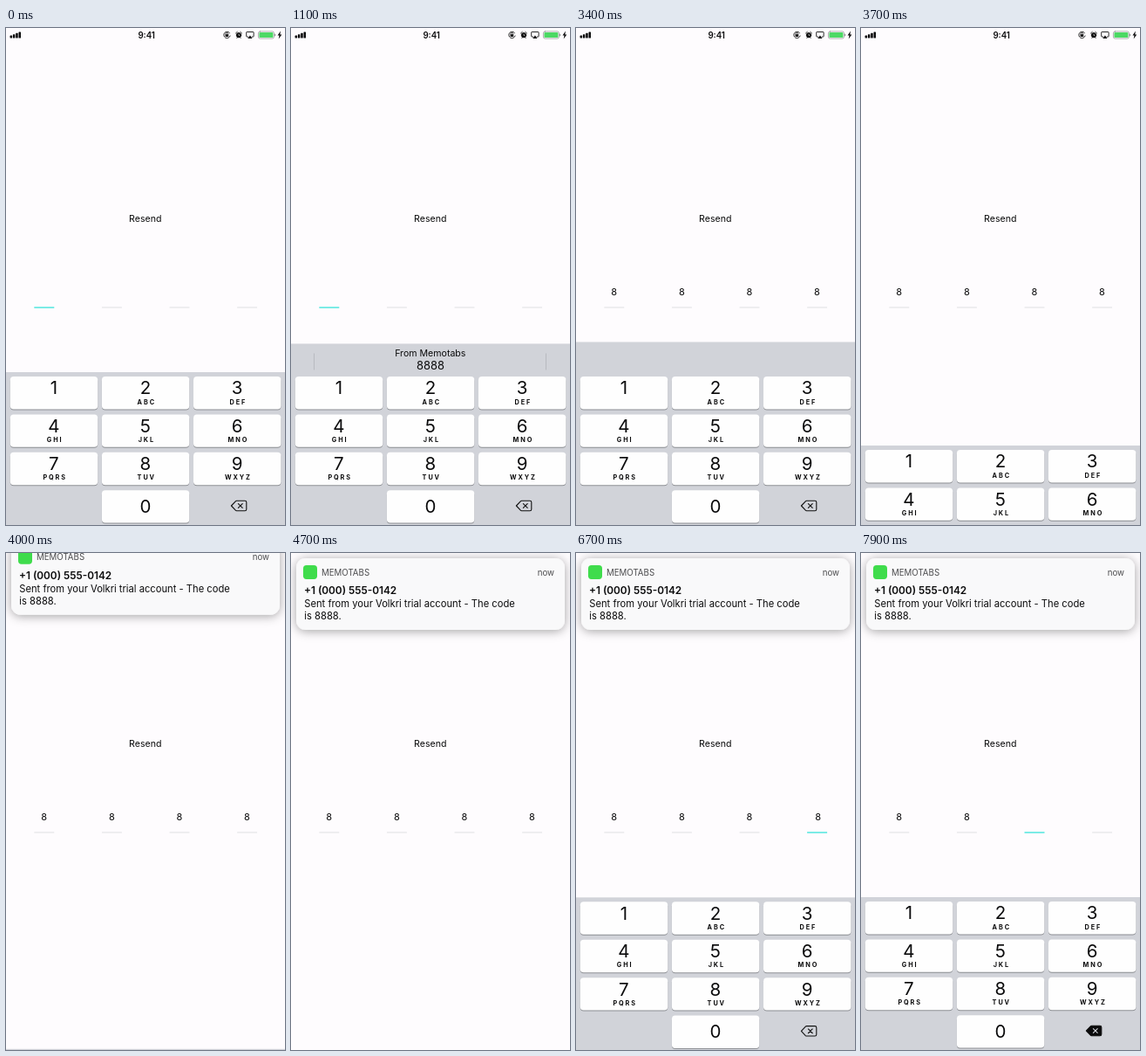
Animation, 320 px wide and 569 px high, one loop 8000 ms. Source, as an HTML page:

```html
<!DOCTYPE html>
<html lang="en">
<head>
<meta charset="utf-8">
<title>Code entry</title>
<style>
html, body { margin: 0; width: 100%; height: 100%; overflow: hidden; background: #fefcfe; }
svg { display: block; width: 100%; height: 100%; font-family: Inter, Roboto, sans-serif; fill: #0b0b0c; }
.mid { text-anchor: middle; }
.label { font-size: 10.6px; }
.digit { font-size: 20.5px; }
.letters { font-size: 7.3px; font-weight: 700; letter-spacing: 1.9px; }
.body { font-size: 11.2px; }
.meta { font-size: 9.7px; fill: #4c4c4e; }
.line { fill: none; stroke: #111; stroke-linejoin: round; stroke-linecap: round; }
</style>
</head>
<body>
<svg viewBox="0 0 320 569">
  <defs>
    <filter id="shade" x="-10%" y="-40%" width="120%" height="180%">
      <feDropShadow dx="0" dy="1.5" stdDeviation="6" flood-color="#000" flood-opacity=".36"/>
    </filter>
  </defs>
  <rect width="320" height="569" fill="#fefcfe"/>

  <g id="status">
    <g id="signal"></g>
    <text class="mid" x="161.2" y="11.5" font-size="9.7" font-weight="600">9:41</text>
    <g class="line" stroke-width=".9">
      <path d="M256.6 5.8A3.7 3.7 0 1 0 257.1 9"/>
      <path d="M252.2 7.4v-.8a1.2 1.2 0 0 1 2.4 0v.8"/>
      <circle cx="267" cy="8.2" r="2.7" fill="#111"/>
      <path d="M263.5 6l1.7-1.6M270.5 6l-1.7-1.6M264.9 11.5l.7-.8M269.1 11.5l-.7-.8"/>
      <path d="M277.6 10h-1.4q-.5 0-.5-.5V5q0-.5.5-.5h7.4q.5 0 .5.5v4.5q0 .5-.5.5h-1.4"/>
      <rect x="289.4" y="3.9" width="18" height="8.2" rx="2" stroke="#8b8b8d" stroke-width=".7"/>
    </g>
    <rect x="251.6" y="7.3" width="3.6" height="2.6" rx=".4"/>
    <path d="M267 6.7v1.7h1.2" fill="none" stroke="#fff" stroke-width=".6"/>
    <path d="M279.9 8.6l2.7 3.4h-5.4z"/>
    <rect x="290.4" y="4.9" width="16" height="6.2" rx="1.2" fill="#4cd964"/>
    <path d="M308.1 6.6q1.2.3 1.2 1.4t-1.2 1.4z" fill="#8b8b8d"/>
    <path d="M314.9 3.6l-3.4 5h2l-.8 3.9 3.6-5.1h-2z"/>
  </g>

  <text class="mid label" x="159.8" y="222.3">Resend</text>
  <g id="fields"></g>

  <g id="bar">
    <rect width="320" height="70" fill="#d1d3d9"/>
    <g id="hint">
      <path d="M26.5 11v19M292.5 11v19" stroke="#b8bac0"/>
      <text class="mid label" x="159.8" y="14.4">From Memotabs</text>
      <text class="mid" x="160" y="29.4" font-size="12.9">8888</text>
    </g>
  </g>

  <g id="keyboard">
    <rect y="394" width="320" height="176" fill="#d1d3d9"/>
    <g id="keys"></g>
    <path id="erase" class="line" stroke-width="1.1" d="M258.4 547l4.9-5.2q.5-.5 1.2-.5h9.5q1.8 0 1.8 1.8v7.8q0 1.8-1.8 1.8h-9.5q-.7 0-1.2-.5z"/>
    <path id="cross" class="line" stroke-width="1.1" d="M266.4 544.6l4.8 4.8M271.2 544.6l-4.8 4.8"/>
  </g>

  <g id="notice">
    <rect x="6" y="6" width="308" height="82" rx="11" fill="#f9f9fa" filter="url(#shade)"/>
    <rect x="14" y="14" width="16" height="16" rx="3.7" fill="#3fdc4c"/>
    <text class="meta" x="35" y="25.6">MEMOTABS</text>
    <text class="meta" x="302" y="25.6" text-anchor="end">now</text>
    <text x="15" y="47.2" font-size="11.8" font-weight="600">+1 (000) 555-0142</text>
    <text class="body" x="15.3" y="62">Sent from your Volkri trial account - The code</text>
    <text class="body" x="15.3" y="76">is 8888.</text>
  </g>
</svg>
<script>
const LOOP = 8000, KEYBOARD_HEIGHT = 175, BAR_HEIGHT = 34.5;
const $ = id => document.getElementById(id);

function add(parent, tag, attrs, text = '') {
  const node = document.createElementNS('http://www.w3.org/2000/svg', tag);
  for (const name in attrs) node.setAttribute(name, attrs[name]);
  node.textContent = text;
  return parent.appendChild(node);
}

for (let i = 0; i < 4; i++) {
  const height = 3 + i * 1.4;
  add($('signal'), 'rect', { x: 4.6 + i * 3.3, y: 11.6 - height, width: 2.5, height, rx: .6 });
}

const letters = ['', 'ABC', 'DEF', 'GHI', 'JKL', 'MNO', 'PQRS', 'TUV', 'WXYZ'];
function addKey(digit, col, row) {
  const x = 4.8 + col * 105.1, y = 399 + row * 43.4, center = x + 50;
  const box = { x, width: 100.4, height: 37.4, rx: 4 };
  add($('keys'), 'rect', { ...box, y: y + 1, fill: '#8c8e93' });
  add($('keys'), 'rect', { ...box, y, fill: '#fefefe' });
  add($('keys'), 'text', { class: 'mid digit', x: center, y: digit ? y + 20.4 : y + 25.6 }, digit);
  if (digit) add($('keys'), 'text', { class: 'mid letters', x: center + 1.4, y: y + 31.6 }, letters[digit - 1]);
}
for (let n = 1; n <= 9; n++) addKey(n, (n - 1) % 3, Math.floor((n - 1) / 3));
addKey(0, 1, 3);

const fields = [0, 1, 2, 3].map(i => {
  const x = 32.3 + i * 77.6;
  return {
    center: x + 11.4,
    line: add($('fields'), 'rect', { x, width: 23 }),
    text: add($('fields'), 'text', { class: 'mid', y: 306.2, 'font-size': 11 }, '8')
  };
});

// Each entry: start time, focused field, number of filled fields, delete key held.
const states = [
  [0, 0, 0, false],
  [3400, -1, 4, false],
  [6240, 3, 4, false],
  [7200, 3, 3, true],
  [7400, 3, 3, false],
  [7500, 2, 3, true],
  [7700, 2, 3, false],
  [7800, 2, 2, true]
];

// Critically damped spring, 0 to 1.
function spring(ms, speed = 18.26) {
  const s = Math.max(0, ms) / 1000 * speed;
  return 1 - (1 + s) * Math.exp(-s);
}
const clamp = v => Math.min(1, Math.max(0, v));
const moveY = (id, y) => $(id).setAttribute('transform', `translate(0 ${y.toFixed(2)})`);
const fade = (id, v) => $(id).setAttribute('opacity', v);

function render(t) {
  const [, focus, filled, held] = states.findLast(state => t >= state[0]);
  fields.forEach(({ center, line, text }, i) => {
    const active = i === focus;
    line.setAttribute('y', active ? 319.2 : 319.4);
    line.setAttribute('height', active ? 1.6 : 1.1);
    line.setAttribute('fill', active ? '#5be8e0' : '#e3e3e6');
    text.setAttribute('x', center + (active ? 1.2 : 0));
    text.setAttribute('opacity', i < filled ? 1 : 0);
  });

  moveY('keyboard', KEYBOARD_HEIGHT * (spring(t - 3612.5) - spring(t - 6240)));
  moveY('bar', 394 - BAR_HEIGHT * spring(t - 850));
  fade('bar', t > 850 && t < 3612 ? 1 : 0);
  fade('hint', t < 3400 ? clamp((t - 860) / 200) : 0);

  moveY('notice', -110 * (1 - spring(t - 3780, 15)));
  fade('notice', t > 3780 ? 1 : 0);
  fade('status', 1 - clamp((t - 3750) / 250));

  $('erase').style.fill = held ? '#0b0b0c' : 'none';
  $('cross').style.stroke = held ? '#d1d3d9' : '#111';
}

const start = performance.now();
function tick() {
  render((performance.now() - start) % LOOP);
  requestAnimationFrame(tick);
}
tick();
</script>
</body>
</html>
```
